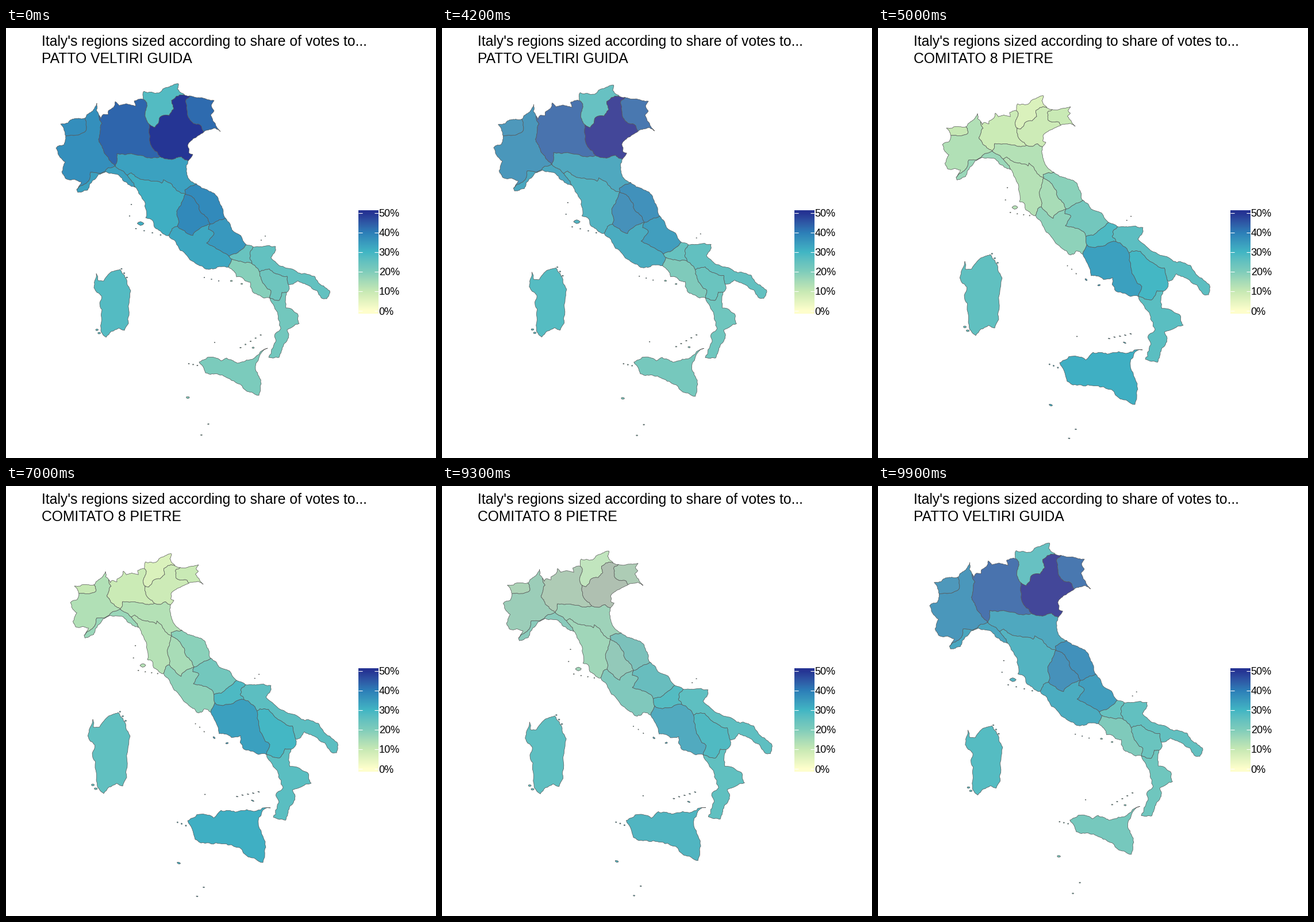
A matplotlib script that plays this animation: 748x748 px, repeating every 10 s.

```python
import numpy as np
import matplotlib.pyplot as plt
from matplotlib.animation import FuncAnimation
from matplotlib.collections import PolyCollection
from matplotlib.colors import to_rgb as hex_rgb

SIZE, DPI = 748, 100
FRAMES, INTERVAL = 100, 100
MOVE = 9  # frames in one transition
rng = np.random.default_rng(7)
plt.rcParams["font.family"] = "Liberation Sans"


def px(n):
    return n * 72 / DPI


# ---- colour: six-step scale blended in CIELAB ----
TO_XYZ = np.array([[.4124, .3576, .1805], [.2126, .7152, .0722], [.0193, .1192, .9505]])
WHITE = np.array([.9505, 1, 1.089])


def to_lab(rgb):
    rgb = np.asarray(rgb, float)
    lin = np.where(rgb > .04045, ((rgb + .055) / 1.055) ** 2.4, rgb / 12.92)
    t = lin @ TO_XYZ.T / WHITE
    f = np.where(t > .008856, np.cbrt(t), 7.787 * t + 16 / 116)
    x, y, z = f[..., 0], f[..., 1], f[..., 2]
    return np.stack([116 * y - 16, 500 * (x - y), 200 * (y - z)], -1)


def to_rgb(lab):
    y = (lab[..., 0] + 16) / 116
    f = np.stack([y + lab[..., 1] / 500, y, y - lab[..., 2] / 200], -1)
    t = np.where(f > .2069, f ** 3, (f - 16 / 116) / 7.787)
    lin = np.clip((t * WHITE) @ np.linalg.inv(TO_XYZ).T, 0, 1)
    return np.clip(np.where(lin > .0031308, 1.055 * lin ** (1 / 2.4) - .055, lin * 12.92), 0, 1)


SCALE = ["#ffffcc", "#c7e9b4", "#7fcdbb", "#41b6c4", "#2c7fb8", "#253494"]
STOPS = to_lab([hex_rgb(c) for c in SCALE])


def scale_lab(share):
    return np.stack([np.interp(share, range(0, 60, 10), STOPS[:, k]) for k in range(3)], -1)


# ---- key points: x, y on the first map and the shift to the second ----
JOINTS = dict(
    a=(137, 157, 16, 15), b=(104, 188, 23, -1), c=(162, 152, 17, 11), d=(190, 240, 9, -26),
    e=(123, 281, 13, -21), f=(239, 124, 2, 20), g=(250, 168, -8, 6), h=(268, 224, -10, -20),
    i=(311, 117, -17, 22), j=(320, 118, -17, 24), k=(344, 181, -26, -12), l=(317, 231, -31, -24),
    m=(211, 256, 7, -28), n=(225, 277, 6, -31), o=(312, 289, -24, -28), p=(331, 271, -25, -20),
    q=(298, 345, -14, -34), r=(283, 361, -9, -35), s=(355, 341, -28, -26), t=(382, 331, -25, -31),
    u=(388, 397, -26, -35), v=(418, 377, -17, -39), w=(430, 381, -13, -35), x=(393, 402, -30, -24),
    y=(428, 410, -14, -39), z=(387, 416, -31, -23), A=(441, 424, -4, -33), B=(491, 446, 13, -6),
    C=(459, 470, -6, -3), D=(488, 460, 8, -2),
)
CAPES = dict(
    viso=(87, 209, 25, -6), blanc=(95, 167, 24, 7), toce=(158, 131, 15, 18),
    orta=(178, 150, 15, 17), spluga=(190, 128, 14, 20), stelvio=(223, 127, 6, 20),
    brenner=(300, 97, -12, 21), tarvisio=(362, 126, -27, 11), trieste=(373, 180, -30, -9),
    po=(325, 220, -33, -21), genoa=(174, 250, 7, -25), piombino=(243, 330, 3, -28),
    conero=(368, 294, -22, -24), rieti=(349, 374, -23, -30), circeo=(344, 417, -14, -26),
    naples=(408, 433, -28, -1), vieste=(469, 380, -8, -33), siponto=(461, 399, -9, -32),
    bari=(514, 428, 6, -20), otranto=(563, 457, 13, -11), paola=(478, 523, 4, 2),
    reggio=(457, 573, 8, 3), locri=(492, 534, 11, 6), crotone=(510, 514, 21, 3),
    trapani=(336, 581, -20, 1), cefalu=(402, 583, -3, -16), messina=(455, 557, 5, 3),
    passero=(440, 639, 7, 16), gela=(370, 603, -13, 20), linosa=(352, 689, -8, 9),
    asinara=(157, 427, -6, -21), teresa=(198, 420, -3, -26), orosei=(217, 457, -1, -22),
    villasimius=(206, 526, -3, -4), teulada=(174, 538, -4, -3), oristano=(163, 478, -13, -13),
)
KEYS = JOINTS | CAPES

# ---- borders: each arc is shared by the regions on both sides ----
arcs = []


def roughen(pts, levels=3, amount=.13):
    for _ in range(levels):
        out = [pts[0]]
        for p, q in zip(pts, pts[1:]):
            d = q - p
            if np.hypot(*d) > 3.5:
                out.append((p + q) / 2 + np.array([-d[1], d[0]]) * rng.uniform(-amount, amount))
            out.append(q)
        pts = np.array(out)
    return pts


def arc(owners, *pts):
    pts = [KEYS[p][:2] if isinstance(p, str) else p for p in pts]
    arcs.append((owners.split(), roughen(np.array(pts, float))))


def ring(region):
    """Chain a region's arcs end to end."""
    left = [pts for owners, pts in arcs if region in owners]
    path = left.pop(0)
    while left:
        k = next(k for k, a in enumerate(left) if (a[[0, -1]] == path[-1]).all(1).any())
        a = left.pop(k)
        path = np.vstack([path, a if (a[0] == path[-1]).all() else a[::-1]])
    return path


# north
arc("Va", "b", (101, 178), "blanc", (108, 165), (112, 160), (126, 157), "a")
arc("Va Pi", "a", (138, 180), (117, 187), "b")
arc("Pi", "a", (147, 147), "toce", (157, 143), "c")
arc("Pi", "b", (101, 203), "viso", (94, 225), (103, 233), (97, 250), (106, 263), (131, 268), "e")
arc("Pi Li", "e", (144, 266), (147, 251), (173, 249), (178, 243), "d")
arc("Pi Lo", "c", (167, 166), (161, 194), (168, 209), (178, 225), "d")
arc("Li", "e", (125, 286), (142, 282), (151, 265), "genoa", (198, 258), (212, 272), "n")
arc("Li Em", "d", (200, 247), "m")
arc("Li To", "m", (217, 264), "n")
arc("Lo", "c", (165, 158), (170, 150), "orta", (178, 144), (187, 138), "spluga", (197, 135),
    (215, 133), (226, 136), "stelvio", "f")
arc("Lo Tr", "f", (245, 130), (242, 150), "g")
arc("Lo Ve", "g", (250, 186), (256, 210), "h")
arc("Lo Em", "d", (193, 219), (214, 219), (246, 226), "h")
arc("Tr", "f", (240, 110), (266, 113), (282, 103), "brenner", (298, 106), "i")
arc("Tr Ve", "i", (296, 119), (288, 126), (292, 140), (284, 152), (268, 155), (259, 173), "g")
arc("Ve", "i", "j")
arc("Ve Fr", "j", (313, 125), (316, 152), (326, 166), (340, 171), "k")
arc("Fr", "j", (340, 121), "tarvisio", (357, 134), (362, 144), (356, 152), (364, 166),
    "trieste", (364, 174), "k")
arc("Ve", "k", (325, 193), (316, 204), (318, 217), "po", "l")
arc("Ve Em", "l", (305, 224), (288, 229), "h")
# centre
arc("Em To", "m", (218, 252), (233, 263), (271, 270), (274, 264), (286, 270), (297, 283), "o")
arc("Em", "l", (314, 247), (322, 267), "p")
arc("Em Ma", "o", (311, 282), (318, 277), "p")
arc("To", "n", (233, 290), (244, 317), "piombino", (255, 335), (258, 346), (273, 358), "r")
arc("To Um", "o", (308, 299), (297, 319), (301, 338), "q")
arc("To La", "q", (289, 349), "r")
arc("Um Ma", "o", (327, 296), (339, 321), "s")
arc("Um La", "s", (341, 346), (325, 361), (311, 353), "q")
arc("Ma", "p", (352, 283), "conero", (376, 313), "t")
arc("Ma Ab", "t", (367, 336), "s")
arc("La Ab", "s", (352, 350), (362, 357), "rieti", (363, 381), "u")
arc("La", "r", (303, 387), (327, 407), "circeo", (362, 419), "z")
arc("La Mo", "u", "x")
arc("La Ca", "x", "z")
arc("Ab", "t", (393, 351), "v")
arc("Ab Mo", "v", (409, 386), (396, 393), "u")
# south
arc("Mo", "v", "w")
arc("Mo Pu", "w", (424, 400), "y")
arc("Mo Ca", "x", (405, 406), "y")
arc("Ca Pu", "y", "A")
arc("Ca", "z", (401, 433), "naples", (425, 442), (428, 457), (449, 470), "C")
arc("Ca Ba", "A", (444, 437), (461, 457), "C")
arc("Pu", "w", (447, 380), "vieste", (469, 387), "siponto", (468, 406), (491, 418), "bari",
    (537, 432), (542, 440), "otranto", (558, 471), (548, 469), (530, 450), (508, 440), "B")
arc("Pu Ba", "B", (489, 432), (472, 428), (458, 419), "A")
arc("Ba", "B", (493, 453), "D")
arc("Ba Cl", "C", (475, 474), (480, 460), "D")
arc("Cl", "C", (473, 499), "paola", (467, 536), (469, 546), "reggio", (475, 573), (483, 551),
    "locri", (489, 525), "crotone", (507, 497), (487, 487), "D")
# islands
arc("Si", "trapani", (350, 573), (374, 579), (384, 574), "cefalu", (424, 577), "messina",
    (434, 594), (444, 619), "passero", (419, 632), (392, 613), "gela", (347, 600), "trapani")
arc("Sa", "asinara", (160, 439), (170, 440), (190, 422), "teresa", (206, 430), "orosei",
    (214, 500), "villasimius", (196, 522), "teulada", (165, 527), (167, 490), "oristano",
    (166, 466), (153, 452), "asinara")

# region: share of each list
SHARES = {
    "Va": (37.2, 10.2), "Pi": (37.1, 13.3), "Li": (33.9, 16.5), "Lo": (43.4, 9.3),
    "Tr": (27.7, 6.6), "Ve": (49.9, 8.9), "Fr": (42.6, 9.6), "Em": (33.8, 12.9),
    "To": (31.5, 12.7), "Um": (38.2, 14.6), "Ma": (38, 18.6), "La": (32.7, 18.1),
    "Ab": (35.3, 22.4), "Mo": (24.3, 28.5), "Ca": (19.2, 33.9), "Pu": (25.3, 26.3),
    "Ba": (23.3, 29.6), "Cl": (22.6, 26.7), "Si": (20.8, 31.2), "Sa": (27.6, 25.7),
}

# chains of islets: region, first, last, count, radius
CHAINS = [
    ("To", (218, 307), (215, 327), 2, .9), ("To", (234, 340), (234, 340), 1, 6),
    ("To", (226, 349), (269, 360), 4, 1.1), ("La", (345, 434), (370, 440), 3, .9),
    ("Ca", (392, 440), (410, 445), 2, 1.8), ("Pu", (444, 369), (451, 362), 2, .7),
    ("Si", (363, 547), (363, 547), 1, .9), ("Si", (408, 556), (443, 534), 5, 1.3),
    ("Si", (430, 556), (430, 556), 1, 2), ("Si", (318, 584), (333, 587), 3, 1.2),
    ("Si", (316, 643), (316, 643), 1, 2.9), ("Si", (352, 689), (340, 708), 2, 1.5),
    ("Sa", (201, 419), (210, 434), 3, 1.5), ("Sa", (158, 525), (162, 531), 2, 2.4),
]


def make_warp(keys):
    """Thin-plate spline through the key points."""
    src, shift = np.split(np.array(keys, float), 2, axis=1)

    def kernel(p):
        r2 = ((p[:, None] - src[None]) ** 2).sum(-1) / 1e4
        return r2 * np.log(r2 + 1e-12) / 2

    def affine(p):
        return np.column_stack([np.ones(len(p)), p / 100])

    n = len(src)
    m = np.zeros((n + 3, n + 3))
    m[:n, :n] = kernel(src) + .002 * np.eye(n)
    m[:n, n:] = affine(src)
    m[n:, :n] = affine(src).T
    w = np.linalg.solve(m, np.vstack([shift, np.zeros((3, 2))]))
    return lambda p: p + np.hstack([kernel(p), affine(p)]) @ w


def islet(centre, radius):
    a = np.linspace(0, 2 * np.pi, 9)[:-1]
    r = radius * rng.uniform(.75, 1.15, a.size)
    return centre + np.column_stack([r * np.cos(a), .6 * r * np.sin(a)])


shapes = [(region, ring(region)) for region in SHARES]
for region, first, last, count, radius in CHAINS:
    shapes += [(region, islet(c, radius)) for c in np.linspace(first, last, count)]

warp = make_warp(list(KEYS.values()))
pairs = [(pts, warp(pts)) for _, pts in shapes]
lab_a, lab_b = scale_lab(np.array([SHARES[region] for region, _ in shapes]).T)

# ---- stage ----
fig = plt.figure(figsize=(SIZE / DPI, SIZE / DPI), dpi=DPI, facecolor="white")
ax = fig.add_axes([0, 0, 1, 1])
ax.axis("off")

levels = np.linspace(50 + 50 / 38, -50 / 38, 180)
ax.imshow(to_rgb(scale_lab(levels))[:, None], extent=(613, 648, 497, 317), aspect="auto",
          interpolation="nearest")
for v in range(0, 60, 10):
    y = 492.3 - v * 3.412
    for x in (613, 641):
        ax.plot([x, x + 7], [y, y], color="white", lw=px(1.1), solid_capstyle="butt")
    ax.text(648.7, y + 6.3, f"{v}%", size=px(18.2), va="baseline")

TITLE = dict(size=px(24.7), va="baseline")
ax.text(62.5, 31, "Italy's regions sized according to share of votes to...", **TITLE)
party = ax.text(62.5, 61, "", **TITLE)

land = PolyCollection([], edgecolors="#555555", linewidths=px(.7), joinstyle="round")
ax.add_collection(land, autolim=False)
ax.set_xlim(0, SIZE)
ax.set_ylim(SIZE, 0)

PARTIES = ["PATTO VELTIRI GUIDA", "COMITATO 8 PIETRE"]


def draw(i):
    half, step = divmod(i % FRAMES, FRAMES // 2)
    t = max(0, step - (FRAMES // 2 - MOVE)) / MOVE
    p = 1 - t if half else t
    land.set_verts([a + p * (b - a) for a, b in pairs])
    land.set_facecolor(to_rgb(lab_a + p * (lab_b - lab_a)))
    party.set_text(PARTIES[half ^ (t > .6)])
    return land, party


anim = FuncAnimation(fig, draw, frames=FRAMES, interval=INTERVAL, repeat=True, repeat_delay=0)
plt.show()
```
